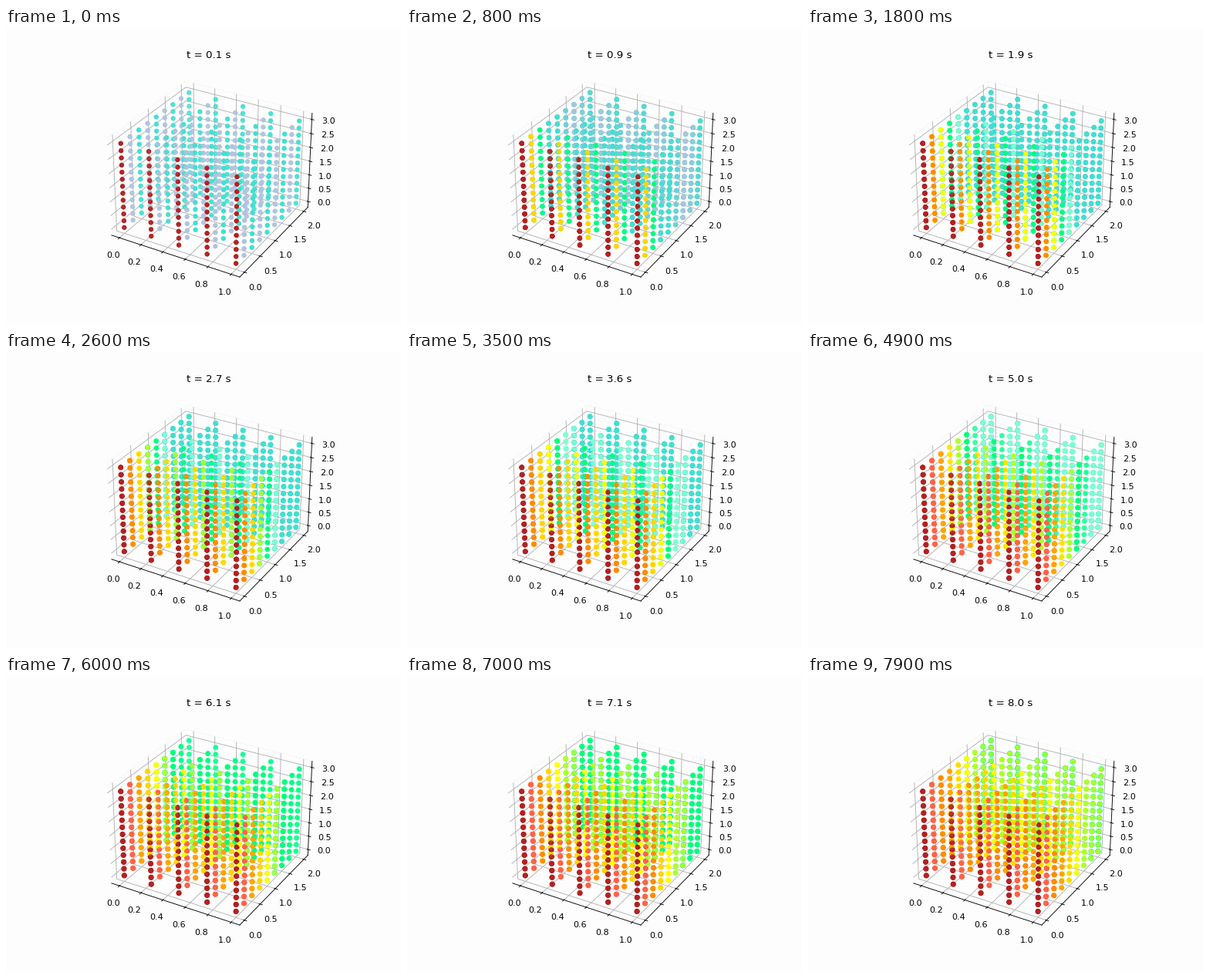
Recreate the animation shown at these times as a matplotlib script. Size 512x384 px, loop 8 s.

```python
import numpy as np
import matplotlib.pyplot as plt
from matplotlib.animation import FuncAnimation
from matplotlib.colors import to_rgba_array

STEPS, DT, H, DIFF = 80, 0.1, 0.25, 0.125
LAYERS = 10
PAPER = "#fdfdfd"
BANDS = to_rgba_array([
    "lightsteelblue", "turquoise", "aquamarine", "springgreen", "greenyellow",
    "yellow", "gold", "orange", "darkorange", "tomato", "firebrick"])


def diffuse(nodes=9):
    """Linear finite elements in y with Crank-Nicolson; hot at y=0, insulated at y=2."""
    mass = np.zeros((nodes, nodes))
    stiff = np.zeros((nodes, nodes))
    for e in range(nodes - 1):
        cell = np.ix_([e, e + 1], [e, e + 1])
        mass[cell] += np.array([[2, 1], [1, 2]]) / 6
        stiff[cell] += np.array([[1, -1], [-1, 1]])
    half = DIFF * DT / H**2 / 2
    left, right = mass + half * stiff, mass - half * stiff
    left[0] = 0
    left[0, 0] = 1
    u, out = np.zeros(nodes), []
    for _ in range(STEPS):
        rhs = right @ u
        rhs[0] = 1
        u = np.linalg.solve(left, rhs)
        out.append(u)
    return np.array(out)


x, y, z = (a.ravel() for a in np.meshgrid(
    np.arange(5) * H, np.arange(9) * H, np.arange(13) * H, indexing="ij"))
row = np.rint(y / H).astype(int)
band = np.clip(np.floor(diffuse() * 10).astype(int) + 1, 0, len(BANDS) - 1)

fig = plt.figure(figsize=(6.4, 4.8), dpi=80, facecolor=PAPER)
ax = fig.add_subplot(projection="3d", facecolor=PAPER)
for axis in (ax.xaxis, ax.yaxis, ax.zaxis):
    axis.pane.set_alpha(None)
    axis.pane.set_facecolor(PAPER)
    axis.pane.set_edgecolor("#f7f7f7")


def cloud(shade):
    return ax.scatter(x, y, z, c=BANDS[band[0][row]], s=20, depthshade=shade)


# Translucent layers pile up over time; the base stands for all older ones.
base = cloud(False)
layers = [cloud(True) for _ in range(LAYERS)]
title = ax.set_title("")


def paint(points, step):
    points.set_visible(True)
    points.set_facecolor(BANDS[band[step][row]])


def update(n):
    history = [0, 0] + list(range(n + 1))
    older = max(len(history) - LAYERS, 0)
    base.set_visible(False)
    if older:
        paint(base, history[older - 1])
        base.set_linewidth(1.5 + 0.6 * (1 - np.exp(-older / 20)))
    recent = history[older:]
    for i, points in enumerate(layers):
        points.set_visible(False)
        if i < len(recent):
            paint(points, recent[i])
    title.set_text(f"t = {(n + 1) * DT:.1f} s")
    return [base, *layers, title]


anim = FuncAnimation(fig, update, frames=STEPS, interval=100,
                     init_func=lambda: update(0), repeat=True, repeat_delay=0)
plt.show()
```
